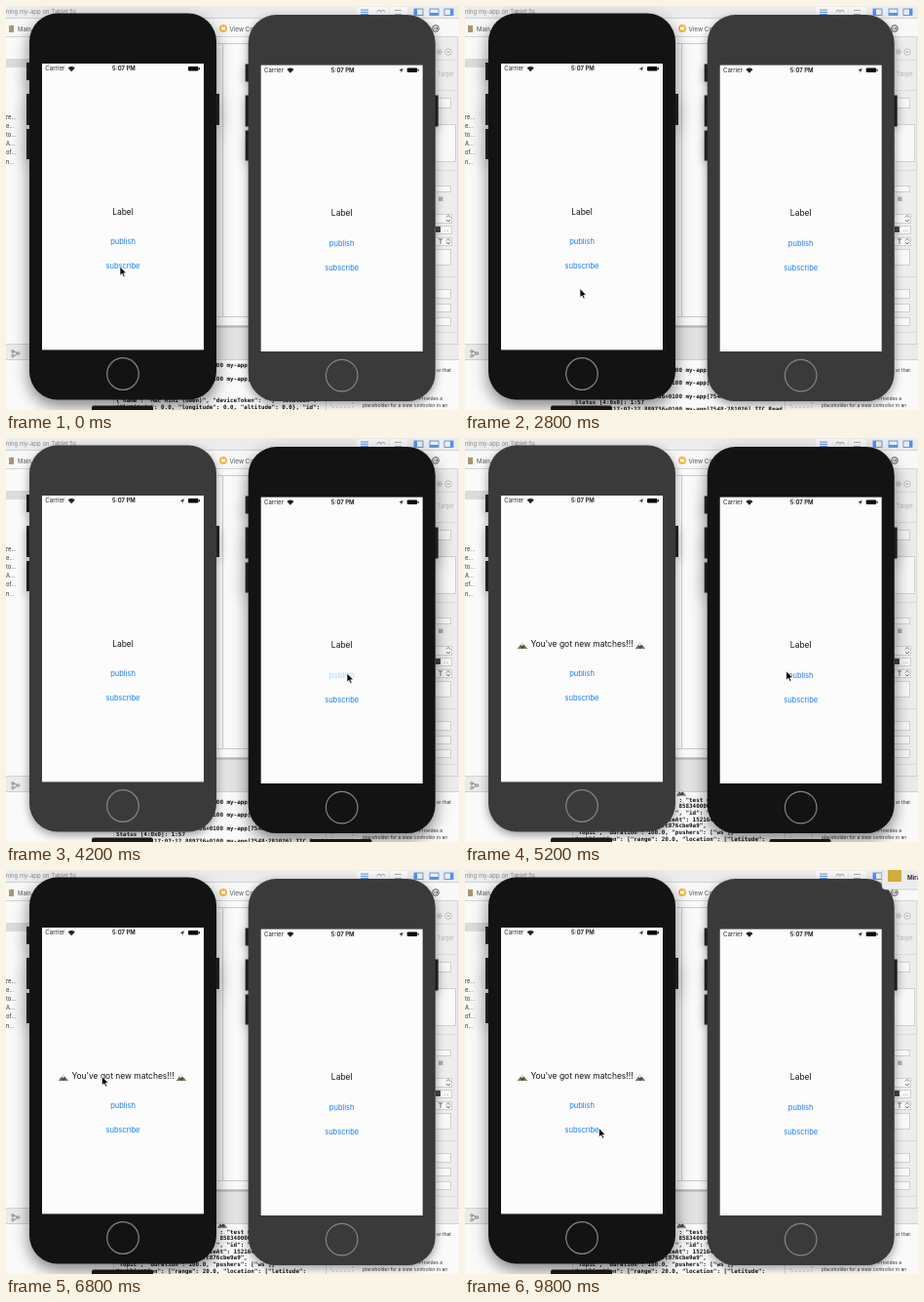
These frames come from a looping animation (465 by 414 pixels, 10000 ms). An HTML page:

```html
<!DOCTYPE html>
<html lang="en">
<head>
<meta charset="utf-8">
<style>
  html, body { margin: 0; width: 100%; height: 100%; overflow: hidden; background: #fff; }
  svg { display: block; font-family: Inter, Roboto, sans-serif; }
  .mono { font: bold 5.9px "DejaVu Sans Mono", monospace; white-space: pre; }
  .mid { text-anchor: middle; }
  .link { fill: #167efb; font-size: 7.5px; }
</style>
</head>
<body>
<svg id="stage" width="465" height="414" viewBox="0 0 465 414"></svg>
<script>
const rect = (x, y, w, h, fill, extra = '') =>
  `<rect x="${x}" y="${y}" width="${w}" height="${h}" fill="${fill}" ${extra}/>`;
const text = (x, y, size, content, fill = '#333', extra = '') =>
  `<text x="${x}" y="${y}" font-size="${size}" fill="${fill}" ${extra}>${content}</text>`;
const line = (d, stroke = '#bbb', width = 1) =>
  `<path d="${d}" fill="none" stroke="${stroke}" stroke-width="${width}"/>`;
const field = (y, h, w = 16) => rect(440.5, y + .5, w, h, '#f8f8f8', 'stroke="#d0d0d0"');

function panelIcon(x, side, color) {
  const bar = { left: [x, 3, 3, 6], bottom: [x, 7, 9, 2], right: [x + 6, 3, 3, 6] }[side];
  return rect(x, 3, 9, 6.5, 'none', `stroke="${color}" stroke-width=".9"`) + rect(...bar, color);
}

function editor() {
  const files = ['re...', 'e...', 'to...', 'A...', 'of...', 'n...'];
  const blue = '#5590ea';
  return rect(0, 0, 465, 414, '#fafafa') +
    // title bar and jump bar
    rect(0, 0, 465, 12, '#ececec') + line('M0 12.5H465', '#d2d2d2') +
    text(0, 8.4, 6, 'ning my-app on Tablet 5s', '#8a8a8a') +
    rect(360, 1, 33, 10, '#f7f7f7', 'rx="2"') + rect(394, 1, 18, 10, '#f7f7f7', 'rx="2"') +
    line('M364 4h8M364 6.3h8M364 8.6h8', blue) +
    line('M381 6.3a2 2 0 1 1 4 0a2 2 0 1 1 4 0M399 4.5h7M406 8.5h-7', '#aaa') +
    panelIcon(419, 'left', blue) + panelIcon(435, 'bottom', blue) + panelIcon(450, 'right', blue) +
    rect(0, 13, 465, 18, '#f8f8f8') + line('M0 31.5H465', '#d6d6d6') +
    rect(3, 20, 5, 7, '#a99872') + text(12, 25.5, 6, 'Main.storyboard', '#555') +
    `<circle cx="223" cy="23" r="4" fill="#f2b63f"/>` + rect(221, 21.5, 4, 3, '#fff') +
    text(229.5, 25.5, 6.3, 'View Controller', '#555') +
    `<circle cx="441" cy="23" r="3.3" fill="none" stroke="#555"/>` + line('M439 23h4m-1.5-1.5l1.5 1.5-1.5 1.5', '#555', .8) +
    // navigator and canvas
    rect(0, 32, 25, 316, '#fafafa') + rect(0, 54, 25, 9, '#dcdcdc') +
    files.map((name, i) => text(0, 116 + i * 9.1, 5.8, name, '#333')).join('') +
    line('M217 38.5h32M222.5 38V318M217 318.5h32', '#ccc') +
    rect(216, 327, 34, 35, '#e2e2e2') + line('M216 328.5h34', '#b4b4b4', 2) +
    // inspector
    rect(440, 32, 25, 316, '#ededed') + line('M463.5 32V348', '#dcdcdc') +
    `<g fill="#f8f8f8" stroke="#aaa" stroke-width=".8"><circle cx="445" cy="47" r="2.4"/><circle cx="454" cy="47" r="3.2"/></g>` +
    line('M443.8 47h2.4M452.7 46.4l1.3 1.3 1.3-1.3', '#555', .8) + text(443, 72, 5.6, 'Target', '#b4b4b4') +
    [55, 86, 168, 277, 334].map(y => line(`M441 ${y}.5h22`, '#dadada')).join('') +
    field(94, 10) + field(121, 38, 21) + field(184, 6) + rect(444, 195.5, 4.5, 4.5, '#aaa') +
    field(213, 9, 17) + line('M452 216.5l2-2 2 2M452 219l2 2 2-2', '#555', .8) +
    field(225, 8, 17) + rect(441, 226, 5, 6, '#444') + text(450, 231, 5, '...', '#333') +
    field(237, 8, 17) + line('M444 239h4M446 239v5M452 240.5l2-2 2 2M452 242l2 2 2-2', '#555', .8) +
    field(249, 16) + field(290, 9) + field(305, 8) + field(319, 8) +
    // debug area
    rect(0, 347, 25, 15, '#ebebeb') + rect(440, 347, 25, 15, '#ebebeb') + line('M0 346.5H25M440 346.5H465M0 362.5H465', '#d0d0d0') +
    `<g fill="none" stroke="#777" stroke-width=".9"><circle cx="7" cy="354" r="1.3"/><circle cx="7" cy="358.5" r="1.3"/>
     <circle cx="12.5" cy="356" r="1.3"/><path d="M8.3 354l3 1.5M8.3 358.5l3-2"/></g>` +
    line('M110.5 362V414M328.5 362V414', '#dadada') +
    rect(334, 404, 22, 7, 'none', 'stroke="#dcc0b0" stroke-dasharray="2 2"') +
    text(442, 375, 4.9, 'er that') + text(407, 403.5, 4.9, '<tspan font-weight="700">ence</tspan> - Provides a') +
    text(366, 410.7, 4.9, 'placeholder for a view controller in an');
}

const peak = (x, y) => `<g transform="translate(${x} ${y})">
  <path d="M0 7.5L4.6 1L10 7.5z" fill="#4b4d50"/><path d="M3 3.4L4.6 1L7 4L5.3 3.6 4.4 5z" fill="#eee"/>
  <path d="M0 7.5L2.6 4.8L4.5 7.5z" fill="#6c7a5c"/><path d="M5.5 7.5L7.6 5.4L10 7.5z" fill="#a5793d"/></g>`;

function phone(id, x, y) {
  return `<g id="${id}" transform="translate(${x} ${y})">
    <g id="${id}-body">
      <path d="M21 58h4v18h-4zM21 90h4v32h-4zM21 126h4v31h-4zM215 90h4v32h-4z" fill="#1e1e1e"/>
      <rect x="24" y="7.5" width="192" height="396" rx="29"/>
    </g>
    ${rect(37, 59, 166, 293.4, '#fcfcfc')}
    <circle cx="120" cy="377" r="16.3" fill="none" stroke="#858585" stroke-width="1.2"/>
    ${text(40.3, 66.2, 6.1, 'Carrier', '#222')}
    <path d="M63.6 63.4q3.6-2.8 7.2 0L67.2 67.2z" fill="#222"/>
    ${text(121, 66.2, 6, '5:07 PM', '#111', 'class="mid" font-weight="600"')}
    <path id="${id}-location" d="M178.5 64.4l4.5-2.2-1.9 4.8-.4-2.3z" fill="#222"/>
    ${rect(187, 61.9, 10.5, 4.5, '#050505', 'rx="1"')}${rect(198, 63.2, 1, 2, '#111')}
    <text id="${id}-label" class="mid" x="120" y="213.6" font-size="8.45" fill="#111">Label</text>
    <g id="${id}-peaks">${peak(54, 208.4)}${peak(175, 208.4)}</g>
    <text id="${id}-publish" class="link mid" x="120" y="244.2">publish</text>
    <text id="${id}-subscribe" class="link mid" x="120" y="269.2">subscribe</text>
  </g>`;
}

const stamp = '2018-03-21 17:07:12.889736+0100 my-app[7548:281026]';
// Each log is a list of [baseline, content].
const logs = {
  start: [[370, stamp.slice(0, 39)], [384, stamp.slice(0, 39)],
    [406, '{"name": "Mac Mini (Owen)", "deviceToken": "", "location":'],
    [413, '{"latitude": 0.0, "longitude": 0.0, "altitude": 0.0}, "id":']],
  subscribed: [[374.5, stamp.slice(0, 39)], [388, stamp.slice(0, 42)], [401.5, stamp.slice(0, 43)],
    [408, 'Status [4:0x0]: 1:57'], [414.5, stamp + ' TIC Read']],
  matched: [[372.6, '"properties": {"subject": {}, : "test = '], [379.3, '"createdAt": 1521640032, "x": 8583400000'],
    [386, '"deviceId": "41c08ce2-7f10", ", "id": "6'], [392.6, '"location": {"a": {}, "createAt": 1521640'],
    [399.3, '"id": "b6d5f20e-91a4-02-47c876cbe9a9",'],
    [406, '"Topic", "duration": 100.0, "pushers": ["ws"]}'],
    [412.7, '"publication": ["range": 20.0, "location": ["latitude":']]
};
const logGroup = name => `<g id="log-${name}" class="mono" fill="#111">` +
  logs[name].map(([y, content]) => `<text x="113" y="${y}">${content}</text>`).join('') +
  (name === 'matched' ? peak(217, 359) : '') + '</g>';

document.getElementById('stage').innerHTML = editor() +
  `<svg width="327" height="414">${Object.keys(logs).map(logGroup).join('')}</svg>` +
  rect(88, 409.5, 63, 8, '#1c1c1c', 'rx="2"') + rect(312.5, 411, 63, 8, '#1c1c1c', 'rx="2" id="chip"') +
  phone('left', 0, 0) + phone('right', 224.7, 1.6) +
  `<g id="banner">${rect(0, -8, 60, 28, '#ececec', 'rx="4" stroke="#c2c2c2" stroke-width=".7"')}
    ${rect(6, -2, 14, 14, '#d0ad3c')}${text(26, 10, 6.2, 'Mira', '#222', 'font-weight="600"')}</g>
  <path id="cursor" d="M0 0V9.2L2.1 7.3 3.6 10.6 5.2 9.9 3.7 6.8H6.6z" fill="#000" stroke="#fff" stroke-width=".7"/>`;

const get = id => document.getElementById(id);
const show = (id, on) => get(id).style.display = on ? '' : 'none';

// [time, x, y]
const cursorKeys = [
  [0, 117, 267], [400, 116.5, 267.5], [600, 116.5, 267.5], [800, 118, 272], [1000, 118, 289.5], [2800, 118, 289.5],
  [3800, 346, 246], [4000, 350, 241], [5000, 350, 241], [6200, 77, 212], [6400, 73, 210], [6600, 69, 209.5],
  [6800, 98.5, 211.5], [7000, 126, 214], [7200, 148, 225], [7400, 145, 250], [7600, 140, 261], [7800, 137.5, 264.5], [10000, 137.5, 264.5]
];
const slideKeys = [[0, 465], [7000, 465], [7800, 428], [10000, 428]];
const subscribeKeys = [[0, 1], [600, 1], [800, .3], [1000, .8], [1200, 1], [10000, 1]];
const publishKeys = [[0, 1], [4000, 1], [4200, .35], [4400, .35], [4800, 1], [10000, 1]];

function sample(keys, t) {
  const i = keys.findIndex(key => key[0] > t);
  const a = keys[i - 1], b = keys[i];
  let k = (t - a[0]) / (b[0] - a[0]);
  k = k * k * (3 - 2 * k);
  return a.slice(1).map((v, n) => v + (b[n + 1] - v) * k);
}

function setFocus(id, focused) {
  const body = get(id + '-body');
  body.setAttribute('fill', focused ? '#131313' : '#3a3a3a');
  body.style.filter = focused ? 'drop-shadow(0 6px 8px rgba(0,0,0,.5))' : 'drop-shadow(0 3px 5px rgba(0,0,0,.4))';
}

function draw(t) {
  const rightFocused = t >= 4200 && t < 6800;
  setFocus('left', !rightFocused);
  setFocus('right', rightFocused);

  const log = t < 1000 ? 'start' : t < 4800 ? 'subscribed' : 'matched';
  for (const name in logs) show('log-' + name, name === log);
  show('chip', t >= 4000 && t < 6800);

  const matched = t >= 5000;
  get('left-label').textContent = matched ? "You've got new matches!!!" : 'Label';
  show('left-peaks', matched);
  show('right-peaks', false);
  show('left-location', t >= 800);
  get('left-subscribe').style.opacity = sample(subscribeKeys, t)[0];
  get('right-publish').style.opacity = sample(publishKeys, t)[0];

  get('cursor').setAttribute('transform', `translate(${sample(cursorKeys, t)})`);
  get('banner').setAttribute('transform', `translate(${sample(slideKeys, t)} 0)`);
  show('banner', t > 7000);
}

let lastStep = -1;
function tick() {
  const step = Math.floor(performance.now() % 10000 / 200);
  if (step !== lastStep) draw((lastStep = step) * 200);
  requestAnimationFrame(tick);
}
tick();
</script>
</body>
</html>
```
